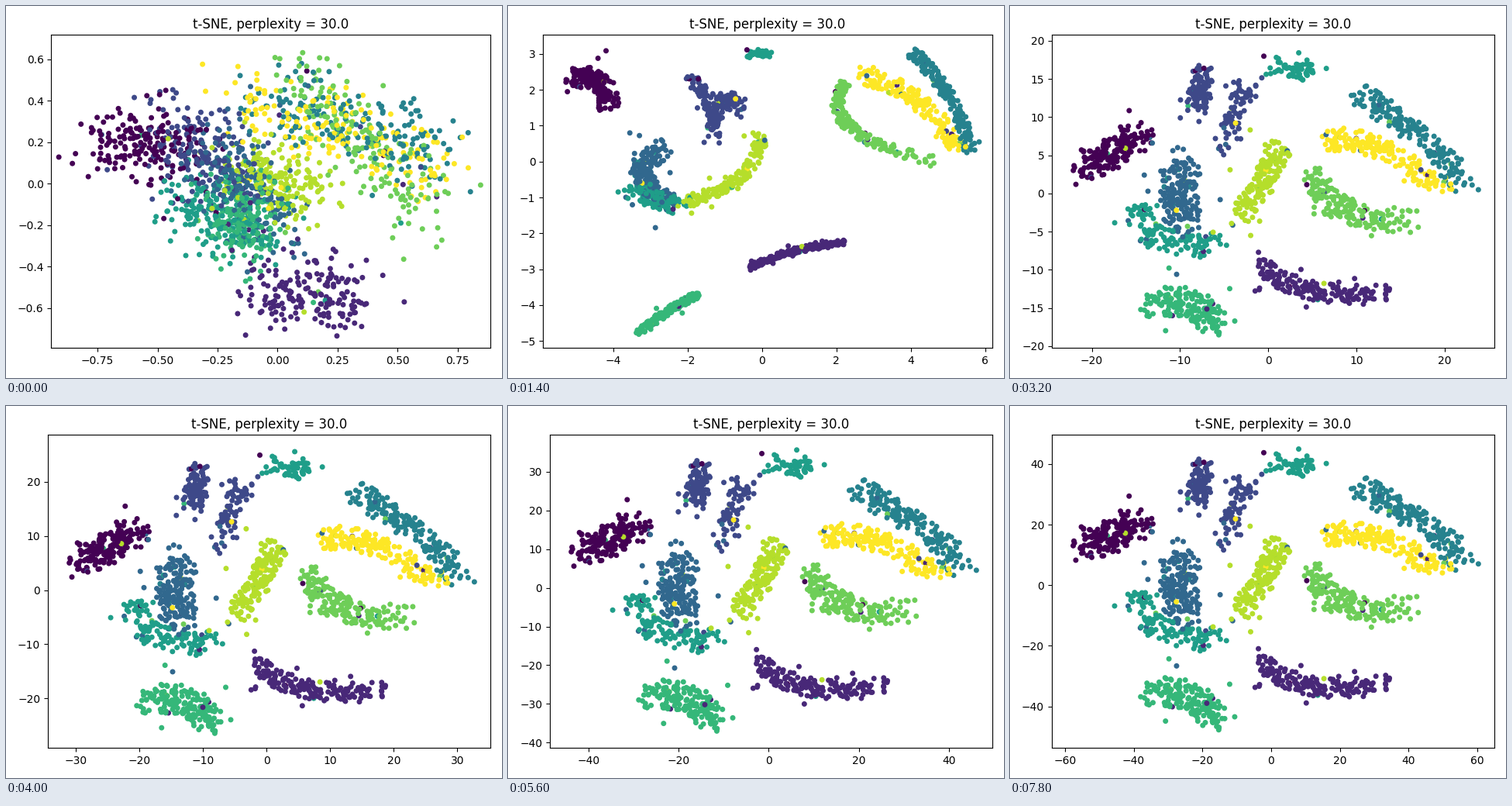
A matplotlib script for the animation above (8000 ms loop, 640x480 px).

```python
import numpy as np
import matplotlib.pyplot as plt
from matplotlib.animation import FuncAnimation

FRAMES, STEP = 40, 200
rng = np.random.default_rng(30)

# Axis limits (x0, x1, y0, y1) at some times in seconds
TIMES = np.array([0, 1.4, 2.4, 4.0, 5.6, 7.0, 7.8])
LIMITS = np.array([
    [-0.9427, 0.8863, -0.793, 0.718],
    [-5.898, 6.198, -5.195, 3.53],
    [-14.81, 16.0, -11.74, 12.49],
    [-34.39, 35.18, -29.18, 28.67],
    [-48.61, 49.65, -41.4, 39.53],
    [-58.71, 60.02, -49.79, 46.57],
    [-63.83, 64.96, -53.7, 49.6],
])
SLOPES = np.gradient(LIMITS, TIMES, axis=0)

# Poses: mixed cloud, condensed threads, sagging islands, final islands
POSE_TIMES = [0, 1.4, 2.4, 7.8]
POSE_LEFT = [58.5, 45.5, 54.5, 54.5]
POSE_EASE = [1, 1.5, 1.9]
RIGHT, TOP, BOTTOM = 625, 37.5, 441
CLOUD = 24

poses, labels = [], []


def along(s, a, b, c):
    """Parabola through a, b and c at s = 0, 0.5 and 1."""
    a, b, c = map(np.array, (a, b, c))
    s = s[:, None]
    return (a * (1 - s) * (1 - 2 * s) + b * 4 * s * (1 - s)
            + c * s * (2 * s - 1))


def to_axes(xy, left):
    return (xy - [left, BOTTOM]) / [RIGHT - left, TOP - BOTTOM]


def group(digit, n, cloud, thread, thin, island, thick):
    """Add n points of one digit; shapes are in pixels from the top left."""
    s, q, turn = rng.random((3, n))
    ring = np.exp(2j * np.pi * turn)
    ring = np.column_stack([ring.real, ring.imag])
    stray = np.where(rng.random(n) < 0.05, 2.8, 1)
    disc = ring * (np.sqrt(q) * stray)[:, None]
    start, stop = map(np.array, cloud)
    first = start + (stop - start) * s[:, None] + rng.normal(0, CLOUD, (n, 2))
    second = along(s, *thread) + thin * disc
    last = along(s, *island) + thick * disc
    sag = 6 + 35 * ((last[:, 0] - 340) / 250) ** 2
    third = last + np.column_stack([0 * sag, sag])
    poses.append([to_axes(p, left) for p, left
                  in zip((first, second, third, last), POSE_LEFT)])
    labels.extend([digit] * n)


group(0, 178, [(115, 175), (240, 185)],
      [(78, 98), (115, 95), (130, 130)], 14,
      [(88, 178), (135, 168), (166, 150)], 22)
group(1, 182, [(325, 362), (450, 380)],
      [(312, 338), (365, 317), (433, 306)], 4,
      [(325, 328), (385, 360), (484, 360)], 13)
group(2, 100, [(215, 140), (260, 230)],
      [(235, 95), (260, 125), (267, 183)], 9,
      [(248, 78), (246, 100), (242, 128)], 15)
group(2, 77, [(240, 150), (310, 230)],
      [(270, 145), (285, 120), (300, 135)], 13,
      [(305, 98), (296, 130), (275, 175)], 17)
group(3, 183, [(270, 190), (350, 290)],
      [(202, 186), (172, 215), (215, 258)], 15,
      [(222, 195), (218, 235), (230, 275)], 26)
group(4, 181, [(320, 115), (565, 195)],
      [(520, 60), (566, 112), (597, 188)], 9,
      [(450, 105), (520, 145), (586, 202)], 18)
group(5, 60, [(230, 255), (290, 280)],
      [(312, 63), (325, 62), (336, 62)], 4,
      [(342, 70), (370, 82), (386, 70)], 12)
group(5, 122, [(220, 255), (330, 290)],
      [(158, 237), (185, 248), (220, 258)], 13,
      [(165, 238), (190, 285), (268, 302)], 17)
group(6, 181, [(290, 262), (315, 300)],
      [(167, 422), (208, 393), (243, 373)], 5,
      [(180, 370), (235, 376), (262, 403)], 20)
group(7, 179, [(375, 85), (550, 270)],
      [(437, 97), (440, 155), (547, 200)], 8,
      [(395, 212), (430, 255), (520, 260)], 18)
group(8, 174, [(310, 215), (385, 235)],
      [(325, 165), (300, 222), (225, 252)], 9,
      [(346, 178), (332, 215), (298, 264)], 17)
group(9, 180, [(280, 115), (560, 205)],
      [(448, 90), (525, 120), (582, 185)], 12,
      [(405, 172), (470, 170), (560, 213)], 16)

poses = np.concatenate(poses, axis=1)
labels = np.array(labels)
order = rng.permutation(len(labels))
poses, labels = poses[:, order], labels[order]
# A few digits sit among the wrong neighbours
odd = rng.random(len(labels)) < 0.04
labels[odd] = rng.integers(0, 10, odd.sum())


def locate(t, times):
    """Segment of times that holds t, its length and the progress in it."""
    k = min(np.searchsorted(times, t, side="right") - 1, len(times) - 2)
    h = times[k + 1] - times[k]
    return k, h, (t - times[k]) / h


def limits_at(t):
    """Cubic Hermite through the known limits."""
    k, h, p = locate(t, TIMES)
    s = p * p * (3 - 2 * p)
    return (LIMITS[k] * (1 - s) + LIMITS[k + 1] * s
            + h * p * (1 - p) * ((1 - p) * SLOPES[k] - p * SLOPES[k + 1]))


def pose_at(t):
    k, _, p = locate(t, POSE_TIMES)
    p = 1 - (1 - p) ** POSE_EASE[k]
    return poses[k] * (1 - p) + poses[k + 1] * p


fig, ax = plt.subplots(figsize=(6.4, 4.8), dpi=100)
ax.set_title("t-SNE, perplexity = 30.0")
dots = ax.scatter(*poses[0].T, c=labels, s=16, cmap="viridis",
                  vmin=0, vmax=9, transform=ax.transAxes)


def update(i):
    t = i * STEP / 1000
    x0, x1, y0, y1 = limits_at(t)
    ax.set_xlim(x0, x1)
    ax.set_ylim(y0, y1)
    dots.set_offsets(pose_at(t))
    fig.tight_layout()
    return dots,


anim = FuncAnimation(fig, update, frames=FRAMES, interval=STEP,
                     init_func=lambda: update(0), repeat=True, repeat_delay=0)
plt.show()
```
